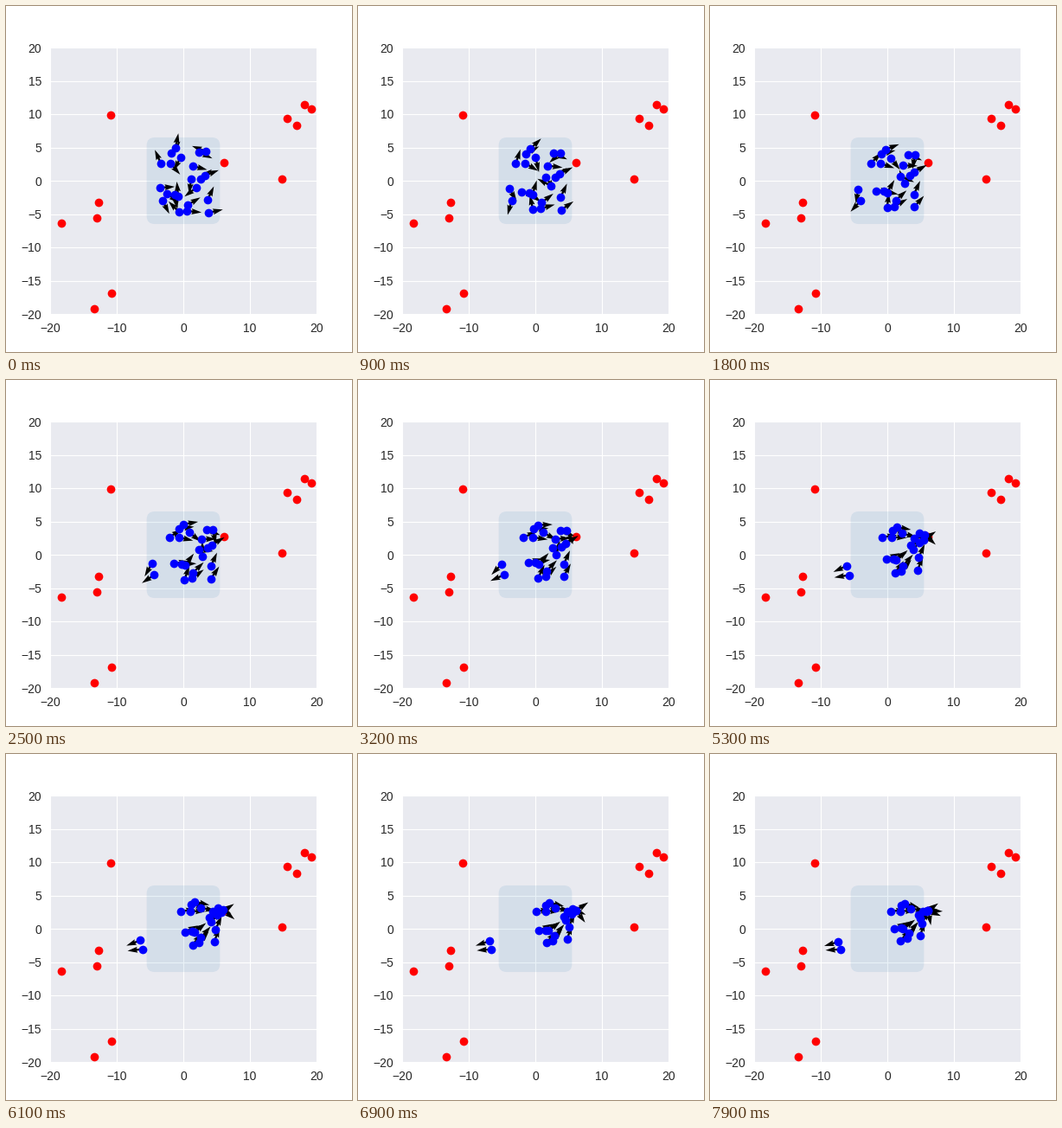
A matplotlib script that plays this animation: 400 px wide and 400 px high, repeating every 8000 ms.

```python
import numpy as np
import matplotlib.pyplot as plt
from matplotlib.animation import FuncAnimation
from matplotlib.patches import FancyBboxPatch

FRAMES = 80
SPEED = 0.05   # data units per frame
TURN = 0.05    # share of the heading error removed per frame


def to_data(px):
    """Stage pixels to axes units."""
    return (np.array(px) - (205, 202)) * (1, -1) / 7.7


targets = to_data([
    (121, 126), (64, 251), (107, 227), (105, 245), (122, 332), (102, 350),
    (252, 181), (319, 200), (325, 130), (336, 138), (345, 114), (353, 119),
])

# Ordered by heading, clockwise-most first
starts = to_data([
    (220, 210), (202, 175), (214, 200), (195, 218), (181, 225), (190, 182),
    (186, 217), (223, 169), (216, 185), (209, 237), (178, 210), (234, 239),
    (230, 196), (210, 230), (225, 200), (191, 170), (233, 224), (196, 164),
    (199, 220), (179, 182), (200, 238), (231, 168),
])


def start_headings(n):
    """A full fan of directions, denser around the x axis."""
    u = np.linspace(-1, 1, n)
    return np.radians(8 + 92 * u + 59 * u**3)


def simulate():
    """Each agent walks to its nearest target while its heading lags."""
    pos, head = starts, start_headings(len(starts))
    for _ in range(FRAMES):
        yield pos, head
        gap = targets - pos[:, None]
        near = np.hypot(*gap.T).argmin(axis=0)
        dx, dy = (targets[near] - pos).T
        aim = np.arctan2(dy, dx)
        pos = pos + SPEED * np.column_stack([np.cos(aim), np.sin(aim)])
        error = (aim - head + np.pi) % (2 * np.pi) - np.pi
        head = head + TURN * error


track = list(simulate())

plt.rcParams.update({
    "font.family": "Liberation Sans",
    "font.size": 10,
    "axes.axisbelow": True,
})
fig, ax = plt.subplots(figsize=(4, 4), dpi=100, facecolor="white")
ax.set_aspect("equal")
ax.set(xlim=(-20, 20), ylim=(-20, 20), facecolor="#E9EAF0",
       xticks=range(-20, 21, 10), yticks=range(-20, 21, 5))
ax.grid(color="white", linewidth=0.8, linestyle="-")
ax.tick_params(length=0, pad=7, labelcolor="0.15")
ax.spines[:].set_visible(False)

ax.add_patch(FancyBboxPatch((-5, -6), 10, 12, linewidth=0,
                            color="#1F77B4", alpha=0.1,
                            boxstyle="round,pad=0.5,rounding_size=1.2"))


def dot_plot(points, color, zorder):
    line, = ax.plot(*points.T, "o", color=color, markersize=7,
                    markeredgewidth=0, zorder=zorder)
    return line


pos, head = track[0]
dot_plot(targets, "red", 1.2)
arrows = ax.quiver(*pos.T, np.cos(head), np.sin(head), color="black",
                   scale=18, scale_units="width", width=0.0075, zorder=1.5)
dots = dot_plot(pos, "blue", 2)


def update(i):
    pos, head = track[i]
    dots.set_data(*pos.T)
    arrows.set_offsets(pos)
    arrows.set_UVC(np.cos(head), np.sin(head))
    return arrows, dots


anim = FuncAnimation(fig, update, frames=FRAMES, interval=100,
                     repeat=True, repeat_delay=0)
plt.show()
```
